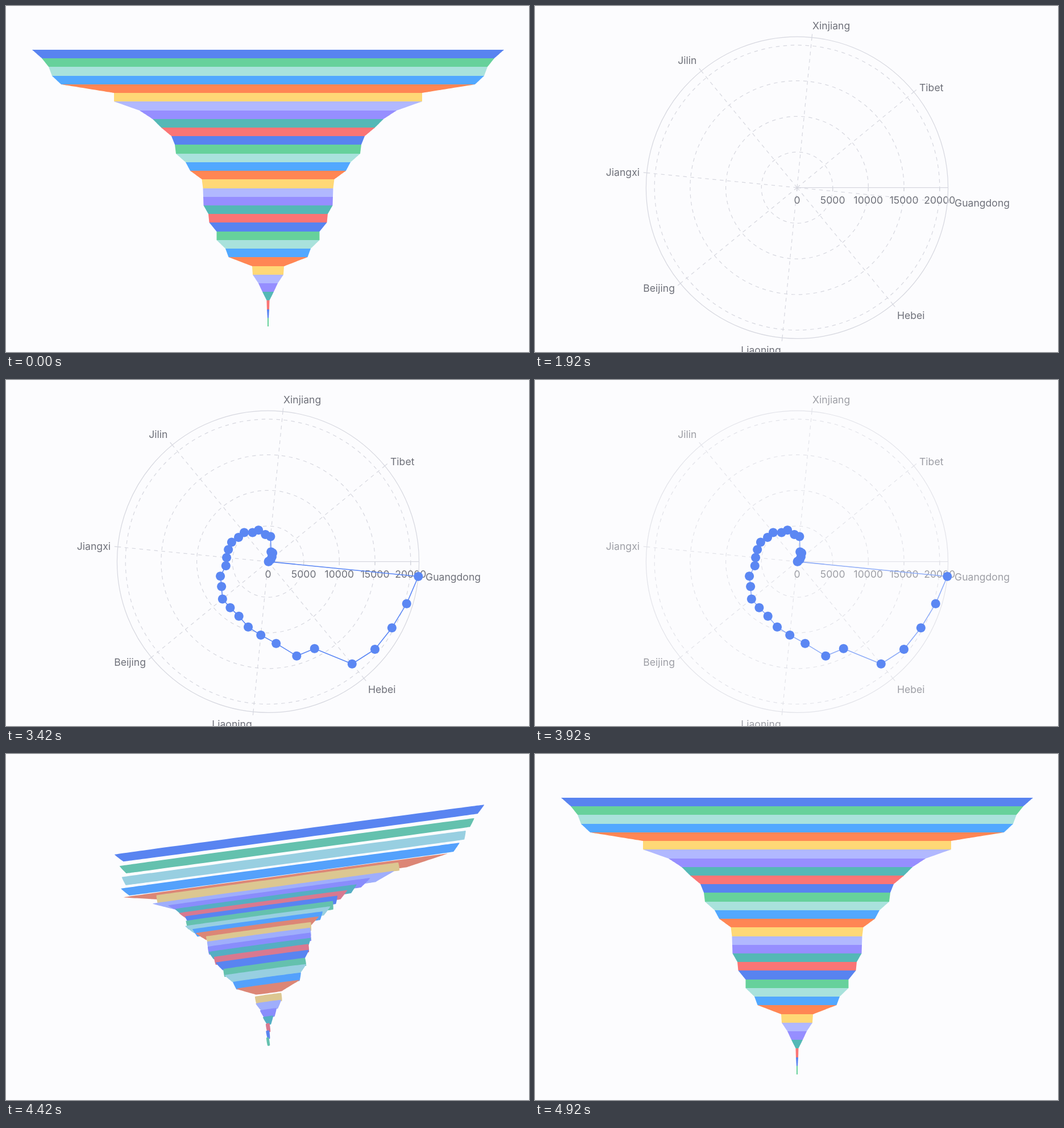
An HTML page that plays this animation: 920x609 px, repeating every 7660 ms.

```html
<!DOCTYPE html>
<html lang="en">
<head>
<meta charset="utf-8">
<title>Polar line to funnel</title>
<style>
  html, body { margin: 0; width: 100%; height: 100%; overflow: hidden; background: #fcfcfe; }
  svg { display: block; width: 920px; height: 609px; }
  text { font: 17.6px Inter, "Noto Sans", sans-serif; fill: #6e7079; }
  .grid { fill: none; stroke: #d6d7df; stroke-width: 1.2; }
  .dash { stroke-dasharray: 6.5 6.5; }
</style>
</head>
<body>
<svg viewBox="0 0 920 609">
  <g id="chart">
    <g id="axes"></g>
    <path id="line" fill="none" stroke="#5b87f5" stroke-width="1.6" stroke-linejoin="bevel"/>
  </g>
  <g id="marks"></g>
</svg>
<script>
const LOOP = 7660, STEP = 1000 / 12;
const CX = 461, CY = 319.7, R = 265.6, DOT = 8, TOP = 77, ROW = 15.22;
const TILT = -Math.PI / 5;
const MORPH_START = 4234, MORPH_TIME = 686;
const K = 0.5523;

// Half width of each funnel edge, from top to bottom
const half = [415, 398, 386, 380, 364, 271, 271, 226, 203, 188, 170, 164, 162, 145, 137, 116.5,
  114.5, 114, 113.5, 105, 103.5, 90.5, 90.5, 75, 69.5, 28, 27, 17, 10, 2.5, 2, 1, 1];
const N = half.length - 1;
const palette = ['#5883f0', '#66d19b', '#a9e2dc', '#52a8ff', '#ff8654', '#ffd876',
  '#b1b8ff', '#968eff', '#54b8b6', '#fa7575'].map(rgb);
const blue = rgb('#5b87f3');

const $ = id => document.getElementById(id);
const mix = (a, b, t) => a + (b - a) * t;

function rgb(hex) {
  return [1, 3, 5].map(i => parseInt(hex.slice(i, i + 2), 16));
}

function add(parent, tag, attrs, text) {
  const el = document.createElementNS('http://www.w3.org/2000/svg', tag);
  for (const k in attrs) el.setAttribute(k, attrs[k]);
  if (text) el.textContent = text;
  parent.appendChild(el);
  return el;
}

function rotate([x, y], a) {
  const c = Math.cos(a), s = Math.sin(a);
  return [x * c - y * s, x * s + y * c];
}

function polar(i, r) {
  const a = (i + 0.5) / N * 2 * Math.PI;
  return [CX + r * Math.cos(a), CY + r * Math.sin(a)];
}

function drawAxes() {
  const g = $('axes');
  const seg = (x1, y1, x2, y2, cls) => add(g, 'line', { x1, y1, x2, y2, class: cls });
  for (let i = 0; i < N; i += 4) {
    seg(CX, CY, ...polar(i, R), 'grid dash');
    seg(...polar(i, R), ...polar(i, R + 6), 'grid');
  }
  for (let i = 0; i < 5; i++) {
    const r = i * 62.7;
    if (i) add(g, 'circle', { cx: CX, cy: CY, r, class: 'grid dash' });
    seg(CX + r, CY, CX + r, CY + 6, 'grid');
    add(g, 'text', { x: CX + r, y: 348, 'text-anchor': 'middle' }, String(i * 5000));
  }
  add(g, 'circle', { cx: CX, cy: CY, r: R, class: 'grid' });
  seg(CX, CY, CX + R, CY, 'grid');
  [
    ['Guangdong', 738, 353.3, 'start'], ['Hebei', 637, 550.5, 'start'],
    ['Liaoning', 397.5, 612, 'middle'], ['Beijing', 246, 502.5, 'end'],
    ['Jiangxi', 184, 299.3, 'end'], ['Jilin', 284.5, 102.3, 'end'],
    ['Xinjiang', 488, 40.5, 'start'], ['Tibet', 676, 150.3, 'start']
  ].forEach(([name, x, y, anchor]) => add(g, 'text', { x, y, 'text-anchor': anchor }, name));
}

const dots = half.slice(0, N).map((h, i) => polar(i, h * R / half[0]));
const circle = [[-DOT, 0], [0, -DOT], [DOT, 0], [0, DOT]];

const marks = dots.map((dot, i) => {
  const y0 = Math.round(TOP + i * ROW), y1 = Math.round(TOP + (i + 1) * ROW);
  const h = (y1 - y0) / 2, a = half[i], b = half[i + 1];
  const corners = [[-a, -h], [a, -h], [b, h], [-b, h]].map(p => rotate(p, TILT));
  return { dot, corners, end: [CX, (y0 + y1) / 2], color: palette[i % 10], el: add($('marks'), 'path', {}) };
});

// Blend a dot into its funnel band: shape, centre and tilt move together
function shape(m, t) {
  const cx = mix(m.dot[0], m.end[0], t), cy = mix(m.dot[1], m.end[1], t);
  const at = (from, to) => {
    const [x, y] = rotate([mix(from[0], to[0], t), mix(from[1], to[1], t)], -TILT * t);
    return (cx + x).toFixed(2) + ' ' + (cy + y).toFixed(2);
  };
  let d = 'M' + at(circle[0], m.corners[0]);
  for (let i = 0; i < 4; i++) {
    const j = (i + 1) % 4, p = circle[i], q = circle[j];
    const c1 = [p[0] + q[0] * K, p[1] + q[1] * K];
    const c2 = [q[0] + p[0] * K, q[1] + p[1] * K];
    d += 'C' + at(c1, m.corners[i]) + ' ' + at(c2, m.corners[j]) + ' ' + at(q, m.corners[j]);
  }
  return d + 'Z';
}

function setMarks(t) {
  for (const m of marks) {
    m.el.setAttribute('d', shape(m, t));
    m.el.setAttribute('fill', `rgb(${blue.map((c, k) => Math.round(mix(c, m.color[k], t)))})`);
  }
}

function show(el, on) {
  el.style.display = on ? '' : 'none';
}

let last = -1;
function render(ms) {
  const frame = Math.floor((ms % LOOP + 4) / STEP);
  if (frame === last) return;
  last = frame;
  const fade = frame < 47 ? 1 : Math.max(0, (49 - frame) / 3);
  show($('chart'), frame >= 23 && frame < 49);
  $('chart').setAttribute('opacity', fade);
  show($('line'), frame >= 29);
  show($('marks'), frame < 16 || frame >= 41);
  const x = Math.min(1, Math.max(0, (frame * STEP - MORPH_START) / MORPH_TIME));
  setMarks(frame < 16 || frame >= 59 ? 1 : 1 - Math.pow(1 - x, 5));
}

drawAxes();
$('line').setAttribute('d', 'M' + dots.map(p => p.join(' ')).join('L') + 'Z');
const start = performance.now();
function tick() {
  render(performance.now() - start);
  requestAnimationFrame(tick);
}
tick();
</script>
</body>
</html>
```
